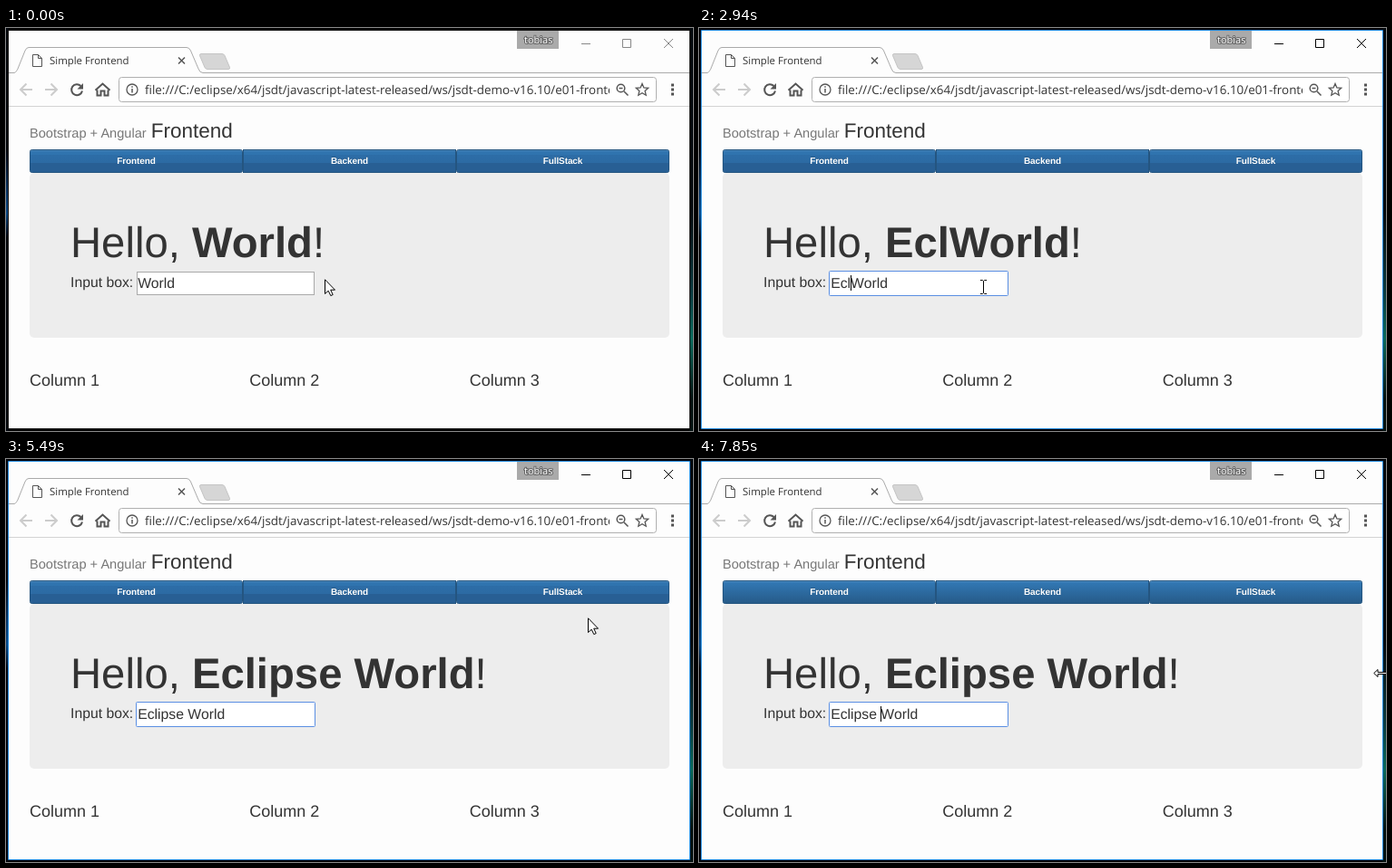
Write an HTML page that moves like this. It is 757 px wide and 445 px high and loops after 8 s.

```html
<!DOCTYPE html>
<html lang="en">
<head>
<meta charset="utf-8">
<title>Simple Frontend</title>
<style>
html, body { margin: 0; height: 100%; overflow: hidden; background: #000; }
svg { display: block; font-family: "Liberation Sans", Arial, sans-serif; fill: #333; text-rendering: geometricPrecision; }
.ui { font-family: "Open Sans", "Noto Sans", sans-serif; }
.line { fill: none; stroke: #555; }
.btn text { font: bold 10px "Liberation Sans", Arial, sans-serif; letter-spacing: -.1px; fill: #fff; text-anchor: middle; text-shadow: 0 -1px 0 rgba(0,0,0,.2); }
.cursor { fill: #fff; stroke: #000; }
</style>
</head>
<body>
<svg width="757" height="445" viewBox="0 0 757 445">
  <defs>
    <linearGradient id="left" x2="0" y2="1">
      <stop offset=".3" stop-color="#02060c"/><stop offset=".4" stop-color="#0a3563"/>
      <stop offset=".46" stop-color="#0b4a86"/><stop offset=".52" stop-color="#02060c"/>
    </linearGradient>
    <linearGradient id="right" x2="0" y2="1">
      <stop offset=".45" stop-color="#03080c"/><stop offset=".66" stop-color="#0a3b40"/>
      <stop offset=".77" stop-color="#0a6a5c"/><stop offset=".92" stop-color="#03100f"/>
    </linearGradient>
    <linearGradient id="banded" x2="0" y2="1">
      <stop offset=".22" stop-color="#3074af"/><stop offset=".22" stop-color="#2d6da7"/>
      <stop offset=".56" stop-color="#2c6ba4"/><stop offset=".56" stop-color="#285f94"/>
    </linearGradient>
    <linearGradient id="smooth" x2="0" y2="1">
      <stop stop-color="#337ab7"/><stop offset="1" stop-color="#265a88"/>
    </linearGradient>
    <linearGradient id="hover" x2="0" y2="1">
      <stop stop-color="#2c699f"/><stop offset=".56" stop-color="#265a88"/>
    </linearGradient>
    <clipPath id="address"><path d="M150 55h515v26h-515z"/></clipPath>
  </defs>

  <path d="M0 0h3v445h-3z" fill="url(#left)"/>
  <path d="M753 0h4v445h-4z" fill="url(#right)"/>
  <path d="M2 2h752v441h-752z" fill="#000"/>
  <path d="M3 3h750v439h-750z" fill="#fdfdfd"/>
  <path id="frame" class="line" d="M2.500 2.500h751v440h-751z"/>

  <!-- title bar -->
  <path d="M563 3h46v20h-46z" fill="#aaa"/>
  <text class="ui" x="571" y="17" font-size="11" fill="#fff" stroke="#666" stroke-width="2" paint-order="stroke">tobias</text>
  <path id="controls" class="line" d="M634 17.500h10M679.500 12.500h9v9h-9zM725 12l10 10M735 12l-10 10"/>
  <path d="M3 49.500H9C11 49 12 47 13 45L21 25Q22.500 21.500 25 21.500H199Q202 21.500 203.500 25L212 45Q213.500 49.500 217 49.500H753" class="line" style="stroke:#aaa"/>
  <path d="M215 28.500h23q2 0 3 2l5.500 13q.5 2-1.500 2h-23q-2 0-3-2l-5.500-13q-.5-2 1.500-2z" fill="#d6d6d6" stroke="#c4c4c4"/>
  <path class="line" d="M29.500 29.500h6l4 4v9h-10zM35.500 29.500v4h4"/>
  <text class="ui" x="48" y="40" font-size="11.400">Simple Frontend</text>
  <path class="line" stroke-width="1.500" d="M190 32.500l7 7M197 32.500l-7 7"/>

  <!-- toolbar -->
  <path class="line" style="stroke:#ccc" stroke-width="2" d="M29 68H16.500M22.500 61.500L16 68l6.500 6.500M43 68H55.500M49.500 61.500L56 68l-6.500 6.500"/>
  <path class="line" stroke-width="2" d="M82.500 64A6 6 0 1 0 84 69.500M100.500 68.500v6h4v-5h4v5h4v-6M98.500 68.800L106.500 61.500l8 7.300"/>
  <path d="M85 61v6.500h-6.500z" fill="#555"/>
  <rect x="124.500" y="54.500" width="592" height="27" rx="3" fill="#fff" stroke="#b0b0b0"/>
  <circle class="line" cx="139" cy="68" r="6" stroke-width="1.300"/>
  <path class="line" stroke-width="1.500" d="M139 67v4.500M139 64.300v1.500"/>
  <text class="ui" x="153" y="73" font-size="13.400" clip-path="url(#address)">file:///C:/eclipse/x64/jsdt/javascript-latest-released/ws/jsdt-demo-v16.10/e01-frontend</text>
  <g class="line" stroke-width="1.500">
    <circle cx="677.500" cy="66.500" r="4.300"/>
    <path d="M681 70l4.500 4.500M675.500 66.500h4"/>
    <path stroke-width="1.300" d="M701 61.500l1.900 4.400 4.800.4-3.600 3.200 1.100 4.700-4.200-2.500-4.200 2.500 1.100-4.700-3.600-3.200 4.800-.4z"/>
  </g>
  <path d="M733 61.500h3v3h-3zM733 66.500h3v3h-3zM733 71.500h3v3h-3z" fill="#555"/>
  <path class="line" style="stroke:#d4d4d4" d="M3 86.500h750"/>

  <!-- page -->
  <text x="26" y="121" font-size="14.625" fill="#777">Bootstrap + Angular</text>
  <text x="159.800" y="121" font-size="22.500">Frontend</text>
  <rect x="26" y="160" width="705" height="182" rx="5" fill="#ededed"/>
  <g id="buttons"></g>
  <text x="71" y="253" font-size="47.250">Hello, <tspan id="name" font-weight="bold">World</tspan>!</text>
  <text x="71" y="286" font-size="15.750">Input box:</text>
  <rect id="box" x="144" y="269" width="196" height="26" fill="#fff"/>
  <text id="value" x="145.200" y="287" font-size="15.750">World</text>
  <path id="caret" d="M0 273h1v17h-1z" fill="#000"/>
  <g font-size="18">
    <text x="26" y="395">Column 1</text>
    <text x="268.300" y="395">Column 2</text>
    <text x="510.700" y="395">Column 3</text>
  </g>

  <path id="arrow" class="cursor" d="M.5 .8V16.500L4.200 13.200 6.800 18.600 9.200 17.500 6.700 12.200H11.500Z"/>
  <path id="beam" class="cursor" style="fill:none" d="M0 .5h2.500l1 1 1-1H7M3.500 1.500v13M0 15.500h2.500l1-1 1 1H7"/>
  <path id="hand" class="cursor" d="M5.500 13.500V2Q5.500.5 7 .5T8.500 2V7.500Q10.800 6.500 11.200 8.300 13.400 7.600 13.800 9.300 16.500 8.700 16.500 11V15Q16.500 17 15 19V22H7.500V20L2 14Q.2 11.700 1.500 10.800 3 10 5.500 13.500M8.500 7.500v4M11.200 8.300v3.500M13.800 9.300v3"/>
  <path id="resize" class="cursor" d="M.7 4.500L5 .5V3.500H17V.5L21.300 4.500 17 8.500V5.500H5V8.500Z"/>
</svg>
<script>
const LOOP = 8000, FOCUS = 670;
const $ = id => document.getElementById(id);
const set = (el, attrs) => { for (const k in attrs) el.setAttribute(k, attrs[k]); };

const kinds = ["arrow", "beam", "hand", "resize"].map($);
const [ARROW, BEAM, HAND, RESIZE] = [0, 1, 2, 3];
// time, cursor, x, y
const moves = [
  [0, ARROW, 351, 277], [280, ARROW, 341, 283], [400, BEAM, 320, 280], [550, BEAM, 310, 278],
  [4660, ARROW, 342, 286], [4800, ARROW, 430, 295], [4950, ARROW, 490, 288], [5070, ARROW, 542, 278],
  [5220, ARROW, 585, 256], [5340, ARROW, 616, 233], [5490, ARROW, 641, 175], [5610, HAND, 634, 149],
  [5730, HAND, 600, 148], [5850, HAND, 540, 147], [6000, HAND, 380, 146], [6120, HAND, 195, 145],
  [6270, HAND, 160, 146], [6390, HAND, 152, 146], [6510, HAND, 380, 146], [6660, ARROW, 562, 184],
  [6810, ARROW, 622, 196], [6930, ARROW, 670, 208], [7050, ARROW, 705, 219], [7170, ARROW, 728, 229],
  [7290, ARROW, 742, 236], [7440, RESIZE, 743, 248], [7560, RESIZE, 743, 244], [7850, RESIZE, 743, 232]
];
const keys = [2290, 2570, 2940, 3060, 3180, 3330, 3450, 3570];
const blinks = [FOCUS, 1200, 1450, 2010, 2290, 4100, 4660, 5220, 5730, 6120, 6660, 7170, 7700];
const passed = (times, t) => times.filter(s => s <= t).length;

const edges = [26, 261, 496, 731];
$("buttons").innerHTML = ["Frontend", "Backend", "FullStack"].map((label, i) => {
  const x = edges[i], w = edges[i + 1] - x;
  return `<g class="btn"><rect x="${x + .5}" y="134.500" width="${w - 1}" height="25" rx="${i == 1 ? 0 : 2}" stroke="#245580"/>
    <path d="M${x + 1} 135.500h${w - 2}" stroke="#fff" stroke-opacity=".12"/>
    <text x="${x + w / 2}" y="150">${label}</text></g>`;
}).join("");
const faces = document.querySelectorAll(".btn rect");

const pen = document.createElement("canvas").getContext("2d");
pen.font = '15.75px "Liberation Sans", Arial, sans-serif';

function draw(t) {
  const focused = t >= FOCUS;
  set($("frame"), { style: `stroke:${focused ? "#1883d7" : "#111"}` });
  set($("controls"), { style: `stroke:${focused ? "#000" : "#888"}` });
  const grow = focused ? .5 : -.5;
  set($("box"), {
    x: 144 - grow, y: 269 - grow, width: 196 + 2 * grow, height: 26 + 2 * grow,
    rx: focused ? 1 : 0, stroke: focused ? "#5b8fe3" : "#a9a9a9"
  });

  const typed = "Eclipse ".slice(0, passed(keys, t));
  $("name").textContent = $("value").textContent = typed + "World";
  const before = t < 1450 ? "World" : typed;
  set($("caret"), {
    transform: `translate(${Math.round(145.2 + pen.measureText(before).width)})`,
    visibility: passed(blinks, t) % 2 ? "visible" : "hidden"
  });

  const [, kind, x, y] = moves[passed(moves.map(m => m[0]), t) - 1];
  kinds.forEach((el, i) => set(el, {
    transform: `translate(${x} ${y})`, visibility: i == kind ? "visible" : "hidden"
  }));
  faces.forEach((el, i) => {
    const over = kind == HAND && x + 7 >= edges[i] && x + 7 < edges[i + 1];
    set(el, { fill: `url(#${over ? "hover" : t < 5610 ? "banded" : "smooth"})` });
  });
}

function tick() {
  draw(performance.now() % LOOP);
  requestAnimationFrame(tick);
}
tick();
</script>
</body>
</html>
```
